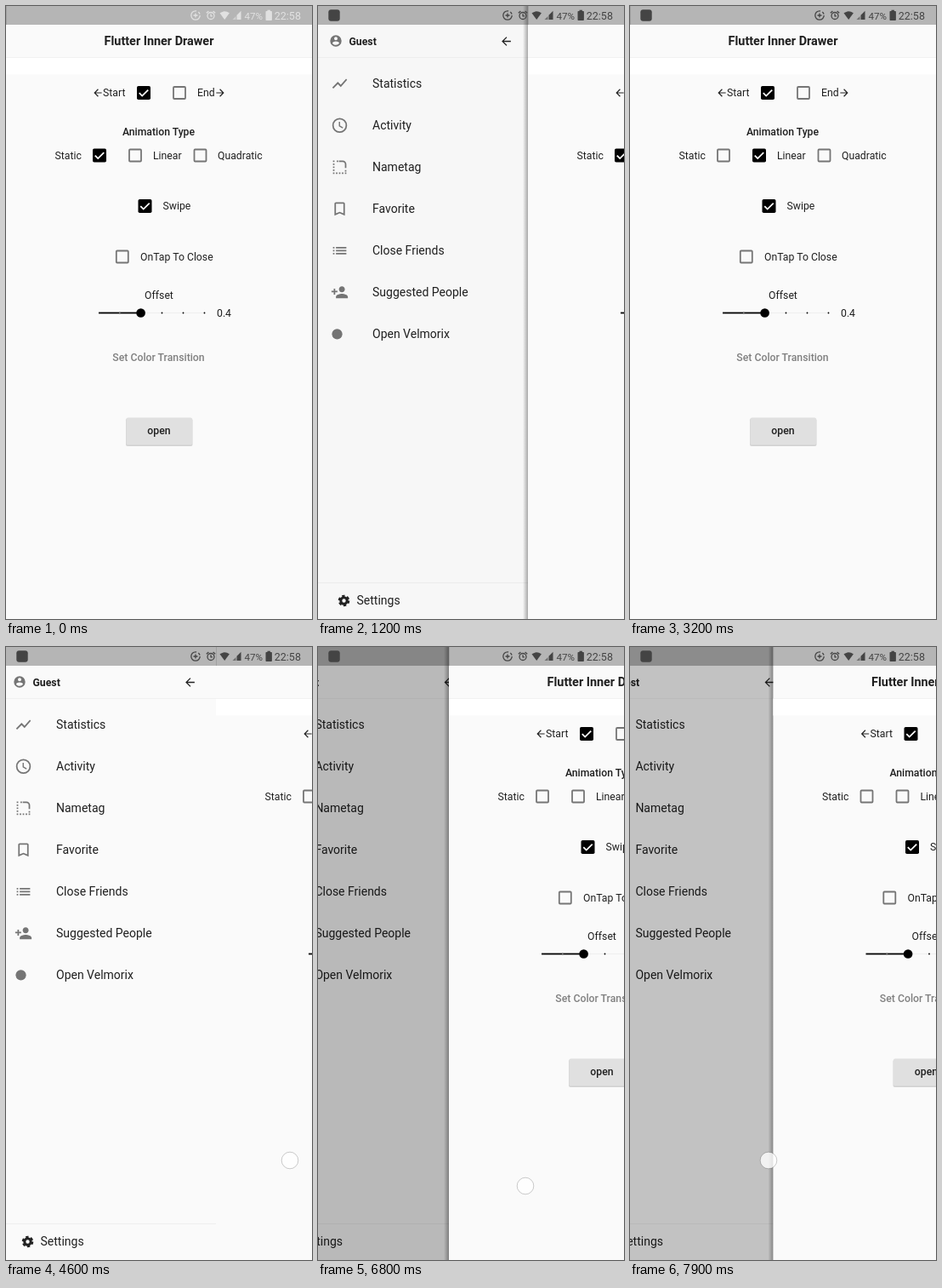
Write an HTML page that moves like this. It is 360 by 720 pixels and loops after 8 s.

```html
<!DOCTYPE html>
<html lang="en">
<head>
<meta charset="utf-8">
<title>Inner drawer demo</title>
<style>
  html, body { margin: 0; width: 100%; height: 100%; overflow: hidden; background: #fafafa; }
  svg { display: block; width: 360px; height: 720px; font-family: Roboto, sans-serif; }
</style>
</head>
<body>
<svg id="stage" viewBox="0 0 360 720"></svg>
<script>
const LOOP = 8000, STEP = 100, OPEN = 252;

// ---- drawing helpers ----
const text = (x, y, str, { size = 12.25, weight = 400, fill = '#1f1f1f', anchor = 'start' } = {}) =>
  `<text x="${x}" y="${y + size * .355}" font-size="${size}" font-weight="${weight}" fill="${fill}" text-anchor="${anchor}">${str}</text>`;

const icon = (x, y, scale, body, color = '#757575') =>
  `<g transform="translate(${x} ${y}) scale(${scale}) translate(-12 -12)" fill="${color}" stroke="none">${body}</g>`;

const path = d => `<path d="${d}"/>`;
const line = (d, width = 2, extra = '') =>
  `<path d="${d}" fill="none" stroke="#757575" stroke-width="${width}" ${extra}/>`;
const rect = (x, y, w, h, fill, extra = '') =>
  `<rect x="${x}" y="${y}" width="${w}" height="${h}" fill="${fill}" ${extra}/>`;

const checkbox = (x, y, checked, id = '') => `<g id="${id}" class="${checked ? 'on' : ''}" transform="translate(${x} ${y})">
  <rect class="off-part" x="-7" y="-7" width="14" height="14" rx="1" fill="none" stroke="#757575" stroke-width="1.8"/>
  <g class="on-part">${rect(-8, -8, 16, 16, '#000', 'rx="1.8"')}
  <path d="M-5.2 .2 -1.8 3.6 5.2 -3.4" fill="none" stroke="#fff" stroke-width="1.8"/></g></g>`;

const backArrow = path('M20 11H7.83l5.59-5.59L12 4l-8 8 8 8 1.41-1.41L7.83 13H20z');
const forwardArrow = path('M12 4l-1.41 1.41L16.17 11H4v2h12.17l-5.58 5.59L12 20l8-8z');

// ---- drawer ----
const menu = [
  ['Statistics', path('M3.5 18.49l6-6.01 4 4L22 6.92l-1.41-1.41-7.09 7.97-4-4L2 16.99z')],
  ['Activity', '<circle cx="12" cy="12" r="9" fill="none" stroke="#757575" stroke-width="2"/>' + line('M11.7 7v5.6l4.5 2.7', 1.6)],
  ['Nametag', line('M11 4h5a4 4 0 0 1 4 4v5') + line('M4 3v18M3 20h18M8 4h2M20 16v2', 2, 'stroke-dasharray="2 2"')],
  ['Favorite', path('M17 3H7c-1.1 0-2 .9-2 2v16l7-3 7 3V5c0-1.1-.9-2-2-2zm0 15l-5-2.18L7 18V5h10v13z')],
  ['Close Friends', path('M3 13h2v-2H3zm0 4h2v-2H3zm0-8h2V7H3zm4 4h14v-2H7zm0 4h14v-2H7zM7 7v2h14V7z')],
  ['Suggested People', path('M15 12c2.21 0 4-1.79 4-4s-1.79-4-4-4-4 1.79-4 4 1.79 4 4 4zm-9-2V7H4v3H1v2h3v3h2v-3h3v-2H6zm9 4c-2.67 0-8 1.34-8 4v2h16v-2c0-2.66-5.33-4-8-4z')],
  ['Open Velmorix', '<circle cx="8.6" cy="12" r="7"/>']
];

const drawer = `
  ${rect(0, 0, OPEN, 720, '#fafafa')}
  ${icon(21, 41, .67, path('M12 2a10 10 0 1 0 0 20 10 10 0 0 0 0-20zm0 3a3 3 0 1 1 0 6 3 3 0 0 1 0-6zm0 14.2c-2.5 0-4.71-1.28-6-3.22.03-1.99 4-3.08 6-3.08s5.97 1.09 6 3.08a7.2 7.2 0 0 1-6 3.22z'))}
  ${text(36.5, 41.5, 'Guest', { weight: 700 })}
  ${icon(221.5, 41.5, .67, backArrow, '#222')}
  ${rect(0, 60, OPEN, .7, '#eee')}
  ${menu.map(([label, body], i) => icon(25.5, 91.3 + 49 * i, .875, body) + text(64, 91.3 + 49 * i, label, { size: 14 })).join('')}
  ${rect(0, 677, OPEN, .7, '#eaeaea')}
  <g transform="translate(30.5 698.5)" fill="none" stroke="#222">
    <circle r="3.7" stroke-width="3"/><circle r="5.7" stroke-width="2.2" stroke-dasharray="3.3 2.67"/></g>
  ${text(45.5, 698.5, 'Settings', { size: 14 })}`;

// ---- main page ----
const mid = { anchor: 'middle' };
const page = `
  <rect id="shadow" x="-6" width="6" height="720" fill="url(#edge)"/>
  ${rect(0, 0, 360, 720, '#fafafa')}
  ${rect(0, 0, .6, 22, '#ccc')}
  ${rect(0, 60, 360, .7, '#eee')}
  ${rect(0, 61, 360, 19.5, '#fff')}
  ${text(180, 41, 'Flutter Inner Drawer', { ...mid, size: 14.4, weight: 700 })}
  ${icon(108, 102, .58, backArrow, '#222')}
  ${text(114, 102, 'Start')}${checkbox(162, 102, true)}
  ${checkbox(204, 102, false)}${text(225, 102, 'End')}
  ${icon(252, 102, .58, forwardArrow, '#222')}
  ${text(179.5, 147.5, 'Animation Type', { ...mid, weight: 500 })}
  ${text(57.5, 175.5, 'Static')}${checkbox(110, 175.5, true, 'mode0')}
  ${checkbox(152, 175.5, false, 'mode1')}${text(173, 175.5, 'Linear')}
  ${checkbox(228.5, 175.5, false, 'mode2')}${text(249, 175.5, 'Quadratic')}
  ${checkbox(163.5, 235, true)}${text(184.5, 235, 'Swipe')}
  ${checkbox(136.8, 294.5, false)}${text(158, 294.5, 'OnTap To Close')}
  ${text(180, 340, 'Offset', mid)}
  ${rect(159, 360, 75, 1, '#eeeeee')}${rect(109, 359.6, 50, 1.8, '#000')}
  ${rect(133, 359.6, 1.6, 1.8, '#777')}
  ${[183.5, 208.5, 233.5].map(x => `<circle cx="${x}" cy="360.5" r=".9"/>`).join('')}
  <circle cx="158.6" cy="360.5" r="5.3"/>
  ${text(248, 361, '0.4')}
  ${text(179.5, 413, 'Set Color Transition', { ...mid, weight: 500, fill: '#808080' })}
  ${rect(141, 484.5, 78.5, 32.5, '#000', 'rx="2" opacity=".16"')}
  ${rect(141.5, 483.5, 77.5, 32, '#e0e0e0', 'rx="1.8"')}
  ${text(180, 499, 'open', { ...mid, weight: 500 })}
  <circle id="ripple" cy="175.5" r="17" opacity="0"/>`;

// ---- status bar ----
const status = `
  ${rect(0, 0, 360, 22, '#000', 'opacity=".28"')}
  ${rect(12.3, 4.3, 13.4, 13.4, '#444', 'id="badge" rx="3"')}
  <g id="signs" fill="none" stroke-width="1.3">
    <circle cx="223" cy="11" r="5.2" stroke-dasharray="25 2.4 3 2.3"/><path d="M220.5 11h5M223 8.5v5"/>
    <circle cx="241" cy="11.5" r="4"/><path d="M241 9.2v2.6h2M235.8 8.3l2.6-2.4M246.2 8.3l-2.6-2.4"/>
    <g fill="currentColor" stroke="none">
      <path d="M251.5 8.3q5.7-4 11.4 0l-5.7 7.7z"/>
      <path d="M271.5 16v-5.3l5-5V16z"/><path d="M266.5 16l4-4v4z" opacity=".6"/>
      <rect x="305.5" y="6" width="7.4" height="11" rx=".8"/><rect x="307.5" y="4.7" width="3.4" height="2"/>
      ${text(280.5, 11.5, '47%', { size: 11.6, fill: 'currentColor' })}
      ${text(315.8, 11.5, '22:58', { size: 12.5, fill: 'currentColor' })}
    </g>
  </g>`;

const stage = document.getElementById('stage');
stage.innerHTML = `
  <style>
    .on-part, .on .off-part { display: none } .on .on-part { display: inline }
    #signs { stroke: currentColor }
  </style>
  <defs><linearGradient id="edge">
    <stop offset="0" stop-opacity="0"/><stop offset="1" stop-opacity=".32"/>
  </linearGradient></defs>
  <g id="drawer">${drawer}</g>
  <rect id="dim" width="360" height="720"/>
  <g id="page">${page}</g>${status}
  <circle id="finger" r="9.8" fill="#fff" fill-opacity=".78" stroke="#000" stroke-opacity=".2"/>`;
const el = id => document.getElementById(id);

// ---- motion ----
// [time, page offset]
const slide = [
  [0, 0], [80, 0], [500, 154], [700, 210], [900, 234], [1200, 247], [1400, OPEN], [1500, OPEN],
  [1800, 168], [2000, 90], [2200, 24], [2400, 0], [3150, 0], [3200, 0], [3700, 154], [3900, 210],
  [4150, 241], [4400, OPEN], [4520, OPEN], [4600, 247], [4900, 172], [5200, 92], [5400, 32], [5700, 0],
  [6350, 0], [6800, 154], [7000, 210], [7200, 238], [7400, 250], [7500, OPEN], [7600, OPEN], [7900, 168.5], [8000, 134]
];
// [start, end, distance from page edge, y]
const drags = [
  [100, 700, 90, 633], [1500, 2100, -30, 587], [3300, 3900, 90, 633],
  [4550, 5250, 87, 603], [6400, 7000, 90, 633], [7600, 8000, -5.5, 603]
];
// [time, x of the tapped checkbox]
const taps = [[2700, 152], [6000, 228.5]];
const drawerFactor = [0, 1, .69];

function offsetAt(t) {
  const i = slide.findIndex(k => k[0] > t);
  const [t0, x0] = slide[i - 1], [t1, x1] = slide[i];
  return x0 + (x1 - x0) * (t - t0) / (t1 - t0);
}

function render(t) {
  const x = offsetAt(t);
  const mode = taps.filter(([at]) => t >= at + 100).length;
  const linear = mode === 1;

  el('page').setAttribute('transform', `translate(${x} 0)`);
  el('drawer').setAttribute('transform', `translate(${(x - OPEN) * drawerFactor[mode]} 0)`);
  el('dim').setAttribute('opacity', linear ? 0 : .68 * (1 - x / OPEN));
  el('shadow').setAttribute('opacity', linear ? 0 : 1);
  for (let i = 0; i < 3; i++) el('mode' + i).setAttribute('class', i === mode ? 'on' : '');

  const tap = taps.find(([at]) => t >= at && t < at + 300);
  el('ripple').setAttribute('opacity', tap ? .13 * (1 - (t - tap[0]) / 300) : 0);
  if (tap) el('ripple').setAttribute('cx', tap[1]);

  const drag = drags.find(([from, to]) => t >= from && t < to);
  const pressed = tap && t < tap[0] + 200;
  const finger = el('finger');
  finger.setAttribute('opacity', drag || pressed ? 1 : 0);
  finger.setAttribute('cx', drag ? x + drag[2] : pressed ? tap[1] : 0);
  finger.setAttribute('cy', drag ? drag[3] : 178);

  const shown = Math.min(1, t / 300);
  el('badge').setAttribute('opacity', shown);
  const tone = Math.round(225 - 157 * shown);
  el('signs').style.color = `rgb(${tone},${tone},${tone})`;
}

function tick() {
  const t = performance.now() % LOOP;
  render(Math.floor(t / STEP) * STEP);
  requestAnimationFrame(tick);
}
tick();
</script>
</body>
</html>
```
